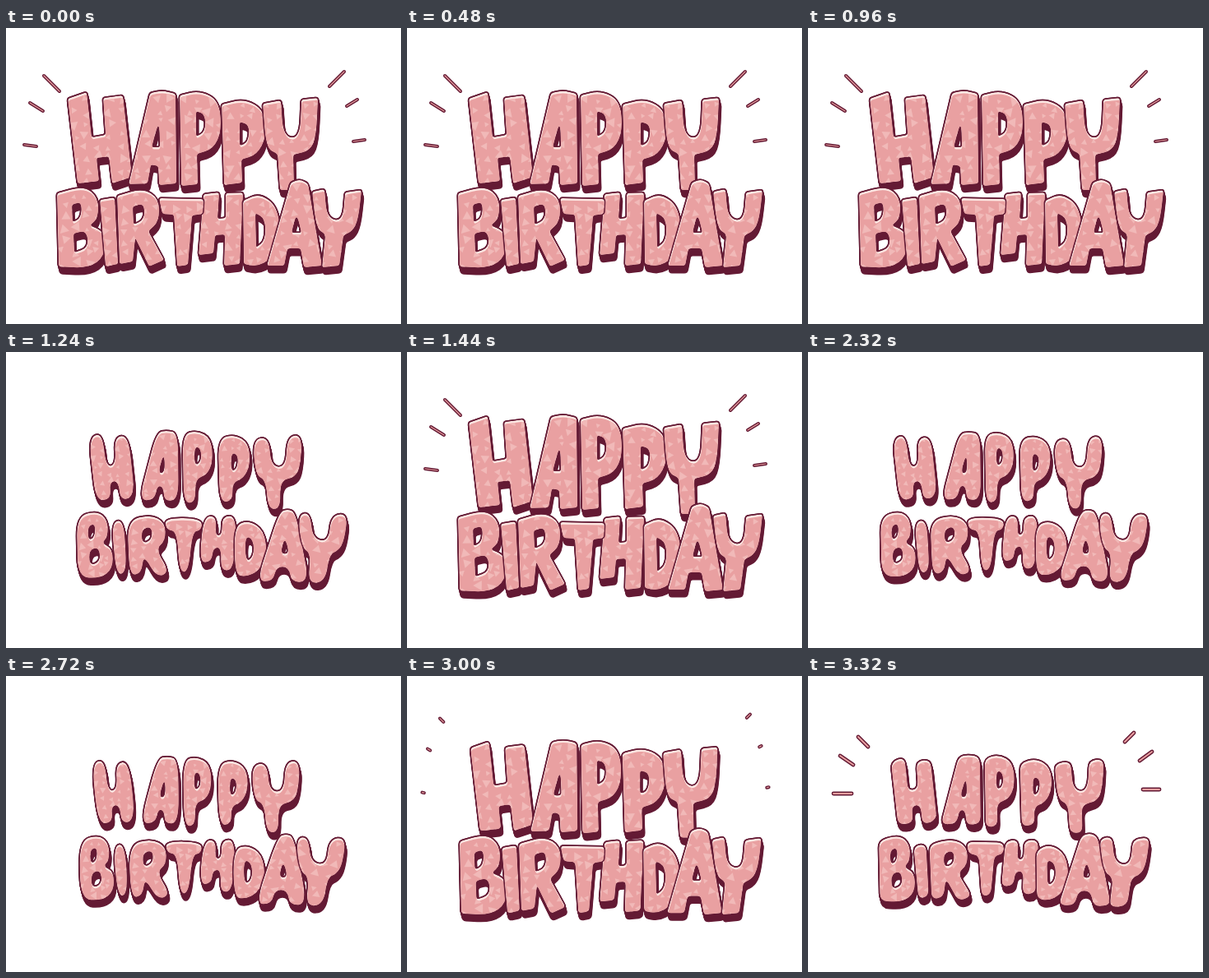
Recreate the animation shown at these times as an HTML page with a canvas. Size 480x360 px, loop 3360 ms.

```html
<!DOCTYPE html>
<html lang="en">
<head>
<meta charset="utf-8">
<title>Happy Birthday</title>
<style>
  html, body { margin: 0; width: 100%; height: 100%; overflow: hidden; background: #fff; }
  canvas { display: block; }
</style>
</head>
<body>
<canvas id="stage" width="480" height="360" aria-label="Happy Birthday"></canvas>
<script>
const ctx = document.getElementById('stage').getContext('2d');
const DARK = '#641a34', PINK = '#e9a0a1', PALE = '#f1b9b8', SHINE = '#fce6e2';
const STEP = 40;

// Per step: letter size (0 small, 1 full), corner rounding, ray travel, ray length.
const SIZE = [1, 1.01, 0.99, 0.93, 0.8, 0.6, 0.35, 0.12, 0, 0, 0.04, 0.11];
const ROUND = [3, 3, 3, 4, 6, 10, 16, 24, 30, 30, 20, 9];
const TRAVEL = [1, 1.2, 1.3, 1.4];
const LENGTH = [1, 0.75, 0.45, 0.2];

// Outline corners at full size; "o" marks a corner that is always curved.
// The box is the letter's left, top, right, bottom when small.
const letter = (outline, ...box) => {
  const loops = outline.split('|').map(loop => loop.trim().split(' ').map(p => {
    const [x, y] = p.replace('o', '').split(',').map(Number);
    return { x, y, curved: p[0] === 'o' };
  }));
  const xs = loops[0].map(p => p.x), ys = loops[0].map(p => p.y);
  return { loops, box, full: [Math.min(...xs), Math.min(...ys), Math.max(...xs), Math.max(...ys)] };
};

const rows = [[
  letter('75,86 98,78 104,133 121,130 118,85 142,82 153,181 129,189 125,156 110,158 113,186 87,189', 104, 101, 157, 180),
  letter('175,79 o190,76 206,80 207,189 186,191 185,168 176,166 172,189 149,190 | o186,111 187,145 177,145', 163, 98, 210, 180),
  letter('211,82 o235,76 o259,88 o262,125 o252,147 232,153 233,190 213,192 | 231,101 o242,105 o242,126 231,132', 215, 98, 250, 183),
  letter('262,93 o290,86 o314,100 o316,133 o305,154 286,160 287,188 265,191 | 284,114 o296,118 o294,139 284,143', 257, 102, 294, 182),
  letter('312,92 334,88 o337,132 o357,134 359,87 379,85 o377,130 o370,149 349,154 350,197 333,197 330,153 o316,146', 298, 103, 357, 190)
], [
  letter('62,201 o95,192 o112,206 o112,231 102,240 o120,248 o120,278 o100,292 64,290 | 80,215 o92,211 o91,231 81,236 | 82,250 o98,246 o100,267 83,273', 89, 193, 131, 273),
  letter('114,209 132,206 136,287 121,290', 130, 204, 148, 268),
  letter('135,204 o166,195 o186,207 o186,235 173,247 192,282 174,290 157,255 154,284 138,287 | 154,217 o168,213 o168,233 155,239', 149, 198, 200, 272),
  letter('240,202 259,200 257,232 267,231 267,201 288,200 284,287 265,289 266,251 254,252 252,274 234,276', 235, 199, 279, 263),
  letter('186,207 240,208 239,226 226,228 221,288 208,290 204,227 190,226', 193, 201, 238, 265),
  letter('288,210 o308,201 o330,217 o334,256 o322,281 o305,290 289,287 | 303,225 o315,232 o315,258 304,267', 276, 205, 315, 271),
  letter('346,188 o357,184 367,189 384,289 362,291 358,268 342,268 338,289 317,289 | o353,224 359,249 347,249', 303, 192, 366, 279),
  letter('372,199 387,196 o390,231 o409,235 412,200 432,197 o428,233 o421,247 410,252 405,289 384,291 388,251 o377,243', 352, 195, 413, 280)
]];

// Each ray: tail and tip when it appears, then tail and tip at full size.
const rays = [
  [73, 86, 61, 74, 65, 77, 46, 58], [55, 108, 39, 97, 45, 101, 29, 91], [53, 143, 31, 143, 37, 144, 22, 142],
  [385, 80, 396, 69, 393, 71, 411, 53], [403, 103, 418, 92, 414, 95, 427, 87], [407, 138, 427, 138, 422, 138, 436, 136]
];

const mix = (a, b, t) => a + (b - a) * t;

function random(seed) {
  return () => (seed = seed * 16807 % 2147483647) / 2147483647;
}

// Maps full-size coordinates into the letter's current box.
function placer({ full, box }, size) {
  const [l, t, r, b] = box.map((v, i) => mix(v, full[i], size));
  return (x, y) => ({
    x: l + (x - full[0]) / (full[2] - full[0]) * (r - l),
    y: t + (y - full[1]) / (full[3] - full[1]) * (b - t)
  });
}

function toward(a, b, reach) {
  const d = Math.hypot(b.x - a.x, b.y - a.y), k = Math.min(reach / d, 0.5);
  return [mix(a.x, b.x, k), mix(a.y, b.y, k)];
}

function shape(glyph, size, rounding) {
  const place = placer(glyph, size), path = new Path2D();
  for (const loop of glyph.loops) {
    const pts = loop.map(p => ({ ...place(p.x, p.y), curved: p.curved }));
    pts.forEach((p, i) => {
      const prev = pts[(i + pts.length - 1) % pts.length], next = pts[(i + 1) % pts.length];
      const reach = p.curved ? 99 : rounding;
      const start = toward(p, prev, reach);
      i ? path.lineTo(...start) : path.moveTo(...start);
      path.quadraticCurveTo(p.x, p.y, ...toward(p, next, reach));
    });
    path.closePath();
  }
  return path;
}

function drawDepth(path) {
  ctx.fillStyle = ctx.strokeStyle = DARK;
  ctx.lineWidth = 3;
  for (let d = 0; d <= 8; d++) {
    ctx.save();
    ctx.translate(d * 0.25, d);
    ctx.fill(path, 'evenodd');
    ctx.stroke(path);
    ctx.restore();
  }
}

function drawFace(glyph, path, size) {
  ctx.save();
  ctx.strokeStyle = DARK;
  ctx.lineWidth = 3;
  ctx.stroke(path);
  ctx.clip(path, 'evenodd');
  ctx.fillStyle = SHINE;
  ctx.fill(path, 'evenodd');
  ctx.translate(0.4, 2.6);
  ctx.fillStyle = PINK;
  ctx.fill(path, 'evenodd');
  ctx.clip(path, 'evenodd');
  drawTriangles(glyph, size);
  ctx.restore();
}

function drawTriangles(glyph, size) {
  const place = placer(glyph, size), [l, t, r, b] = glyph.full, rnd = random(l * 31 + t);
  ctx.fillStyle = PALE;
  for (let y = t + 4; y < b; y += 14) {
    for (let x = l + 4; x < r; x += 14) {
      const cx = x + rnd() * 8, cy = y + rnd() * 8, turn = rnd() * 6.3, radius = 3 + rnd() * 4;
      ctx.beginPath();
      for (let i = 0; i < 3; i++) {
        const a = turn + i * 2.1, p = place(cx + radius * Math.cos(a), cy + radius * Math.sin(a));
        ctx.lineTo(p.x, p.y);
      }
      ctx.fill();
    }
  }
}

function drawRays(travel, length, thick) {
  ctx.lineCap = 'round';
  for (const ray of rays) {
    const [x1, y1, x2, y2] = ray.slice(0, 4).map((v, i) => mix(v, ray[i + 4], travel));
    for (const [color, width] of [[DARK, thick], [PINK, thick - 2.8]]) {
      ctx.strokeStyle = color;
      ctx.lineWidth = width;
      ctx.beginPath();
      ctx.moveTo(mix(x2, x1, length), mix(y2, y1, length));
      ctx.lineTo(x2, y2);
      ctx.stroke();
    }
  }
}

function draw(step) {
  ctx.fillStyle = '#fff';
  ctx.fillRect(0, 0, 480, 360);
  ctx.lineJoin = 'round';
  const size = SIZE[step];
  for (const row of rows) {
    const paths = row.map(glyph => shape(glyph, size, ROUND[step]));
    paths.forEach(drawDepth);
    row.forEach((glyph, i) => drawFace(glyph, paths[i], size));
  }
  if (step === SIZE.length - 1) drawRays(0, 1, 4.8);
  else if (step < TRAVEL.length) drawRays(TRAVEL[step], LENGTH[step], 4);
}

function tick() {
  draw(Math.floor(performance.now() / STEP) % SIZE.length);
  requestAnimationFrame(tick);
}
tick();
</script>
</body>
</html>
```
